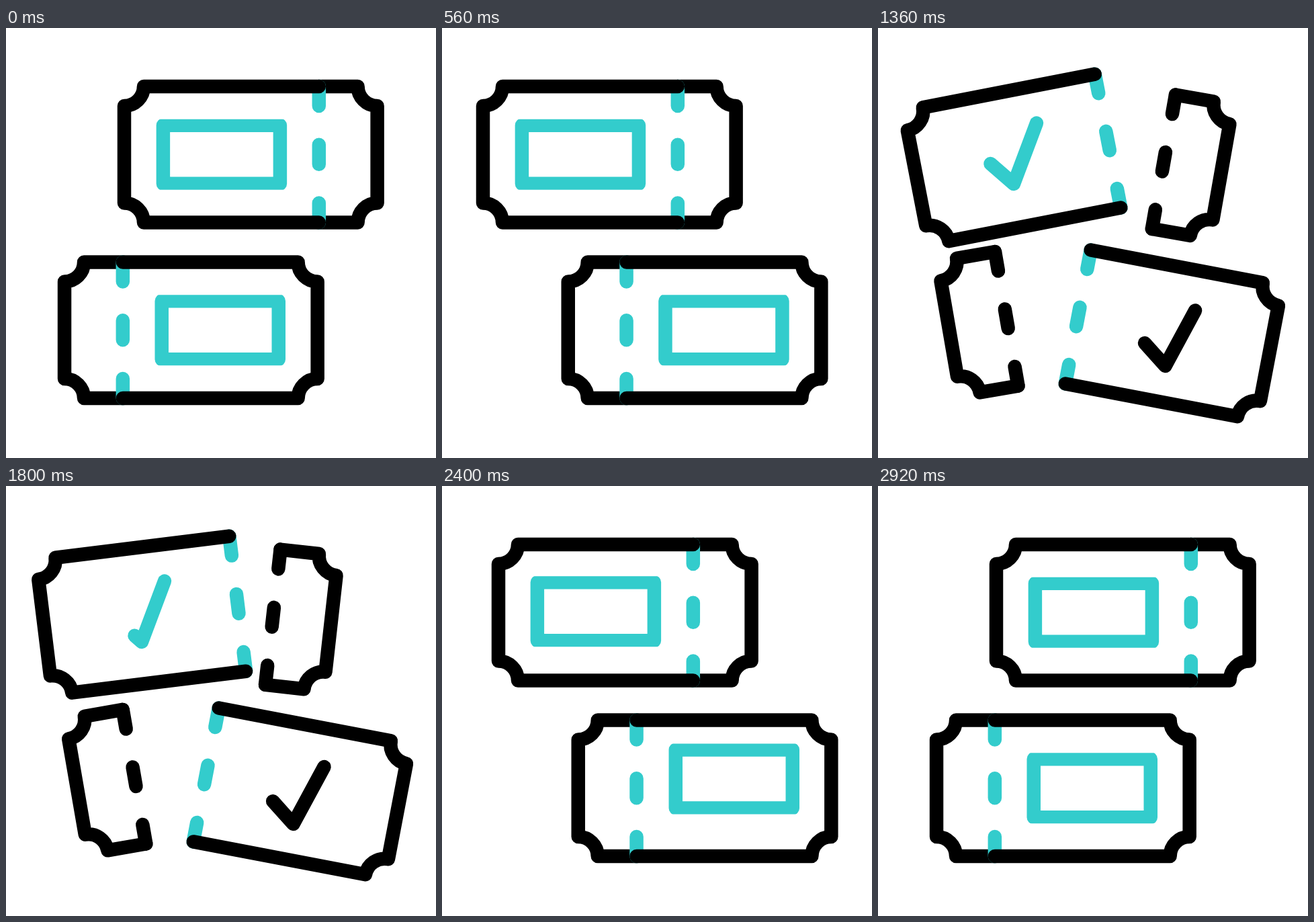
Animation, 640 px wide and 640 px high, one loop 3000 ms. Source, as an HTML page with a canvas:

```html
<!DOCTYPE html>
<html lang="en">
<head>
<meta charset="utf-8">
<title>Tickets</title>
<style>
  html, body { margin: 0; width: 100%; height: 100%; overflow: hidden; background: #fff; }
  canvas { display: block; width: 100vmin; height: 100vmin; }
</style>
</head>
<body>
<canvas id="stage" width="640" height="640"></canvas>
<script>
const ctx = document.getElementById('stage').getContext('2d');
const LOOP = 3000, STEP = 40;
const BLACK = '#000', CYAN = '#33cccc';
const HALF_H = 101.25, NOTCH = 29, BIG = 144.9, SMALL = 43.4;
const SLIDE = 118, DROP = 190;

// Start times: [forward, back]. Poses when torn: [dx, dy, degrees].
const tickets = [
  { x: 320.9, y: 188.25, side: -1, big: [-3.1, 7.45, -11], small: [77, 18.5, 10],
    slide: [97, 2266], drop: [670, 1912], tear: [763, 1632], tick: [815, 1670],
    check: [[167.5, 202], [202, 232], [236, 141.5]], checkColor: CYAN },
  { x: 318.75, y: 449.65, side: 1, big: [3.4, 7.6, 11], small: [-102, -9.7, -10],
    slide: [213, 2357], drop: [782, 2010], tear: [836, 1760], tick: [903, 1787],
    check: [[397, 469], [427.5, 503], [473.5, 418]], checkColor: BLACK }
];

// Cubic bezier (1/3, 0, 1/3, 1): x = u - u^2 + u^3, y = 3u^2 - 2u^3.
function ease(x) {
  if (x <= 0) return 0;
  if (x >= 1) return 1;
  let u = x;
  for (let i = 0; i < 6; i++) u -= (u - u * u + u ** 3 - x) / (1 - 2 * u + 3 * u * u);
  return u * u * (3 - 2 * u);
}

const run = (t, start, length) => ease((t - start) / length);

// Rises from 0 to 1, later falls back to 0.
const there = (t, [go, back], lenGo, lenBack) => run(t, go, lenGo) - run(t, back, lenBack);

// Three-sided outline, open at x = -w, notched at x = w.
function outline(w) {
  ctx.beginPath();
  ctx.moveTo(-w, -HALF_H);
  ctx.lineTo(w - NOTCH, -HALF_H);
  ctx.arc(w, -HALF_H, NOTCH, Math.PI, Math.PI / 2, true);
  ctx.lineTo(w, HALF_H - NOTCH);
  ctx.arc(w, HALF_H, NOTCH, -Math.PI / 2, Math.PI, true);
  ctx.lineTo(-w, HALF_H);
}

function dashes(w, color) {
  ctx.strokeStyle = color;
  ctx.beginPath();
  for (const y of [-HALF_H, -NOTCH / 2, HALF_H - NOTCH]) {
    ctx.moveTo(-w, y);
    ctx.lineTo(-w, y + NOTCH);
  }
  ctx.stroke();
}

function label(w, d) {
  ctx.save();
  outline(w);
  ctx.clip();
  ctx.translate(-0.024 * d, d);
  ctx.beginPath();
  ctx.rect(-100, -52.5, 200, 105);
  ctx.clip();
  ctx.strokeStyle = CYAN;
  ctx.strokeRect(-87, -43.5, 174, 87);
  ctx.restore();
}

function piece(x, y, side, [dx, dy, deg], p, w, inside) {
  ctx.save();
  ctx.translate(x + dx * p, y + dy * p);
  ctx.rotate(deg * p * Math.PI / 180);
  ctx.scale(side, 1);
  inside();
  ctx.strokeStyle = BLACK;
  outline(w);
  ctx.stroke();
  ctx.restore();
}

// Strokes the part of a polyline between the fractions a and b.
function trim(points, a, b, color) {
  if (b - a < 0.001) return;
  const lengths = points.slice(1).map(([x, y], i) => Math.hypot(x - points[i][0], y - points[i][1]));
  const total = lengths.reduce((sum, n) => sum + n);
  ctx.save();
  ctx.setLineDash([(b - a) * total, 2 * total]);
  ctx.lineDashOffset = -a * total;
  ctx.strokeStyle = color;
  ctx.beginPath();
  points.forEach(p => ctx.lineTo(...p));
  ctx.stroke();
  ctx.restore();
}

function drawTicket(k, t) {
  const x = k.x + k.side * SLIDE * there(t, k.slide, 560, 560);
  const torn = there(t, k.tear, 620, 545);
  const d = t < 1600 ? DROP * run(t, k.drop[0], 540) : DROP * (run(t, k.drop[1], 540) - 1);

  piece(x - k.side * (BIG + SMALL), k.y, -k.side, k.small, torn, SMALL, () => {
    if (torn > 0.001) dashes(SMALL, BLACK);
  });
  piece(x, k.y, k.side, k.big, torn, BIG, () => {
    dashes(BIG, CYAN);
    label(BIG, d);
  });
  trim(k.check, run(t, k.tick[1], 540), run(t, k.tick[0], 540), k.checkColor);
}

function frame() {
  const t = Math.floor(performance.now() % LOOP / STEP) * STEP;
  ctx.fillStyle = '#fff';
  ctx.fillRect(0, 0, 640, 640);
  ctx.lineWidth = 20.5;
  ctx.lineCap = ctx.lineJoin = 'round';
  tickets.forEach(k => drawTicket(k, t));
  requestAnimationFrame(frame);
}
frame();
</script>
</body>
</html>
```
